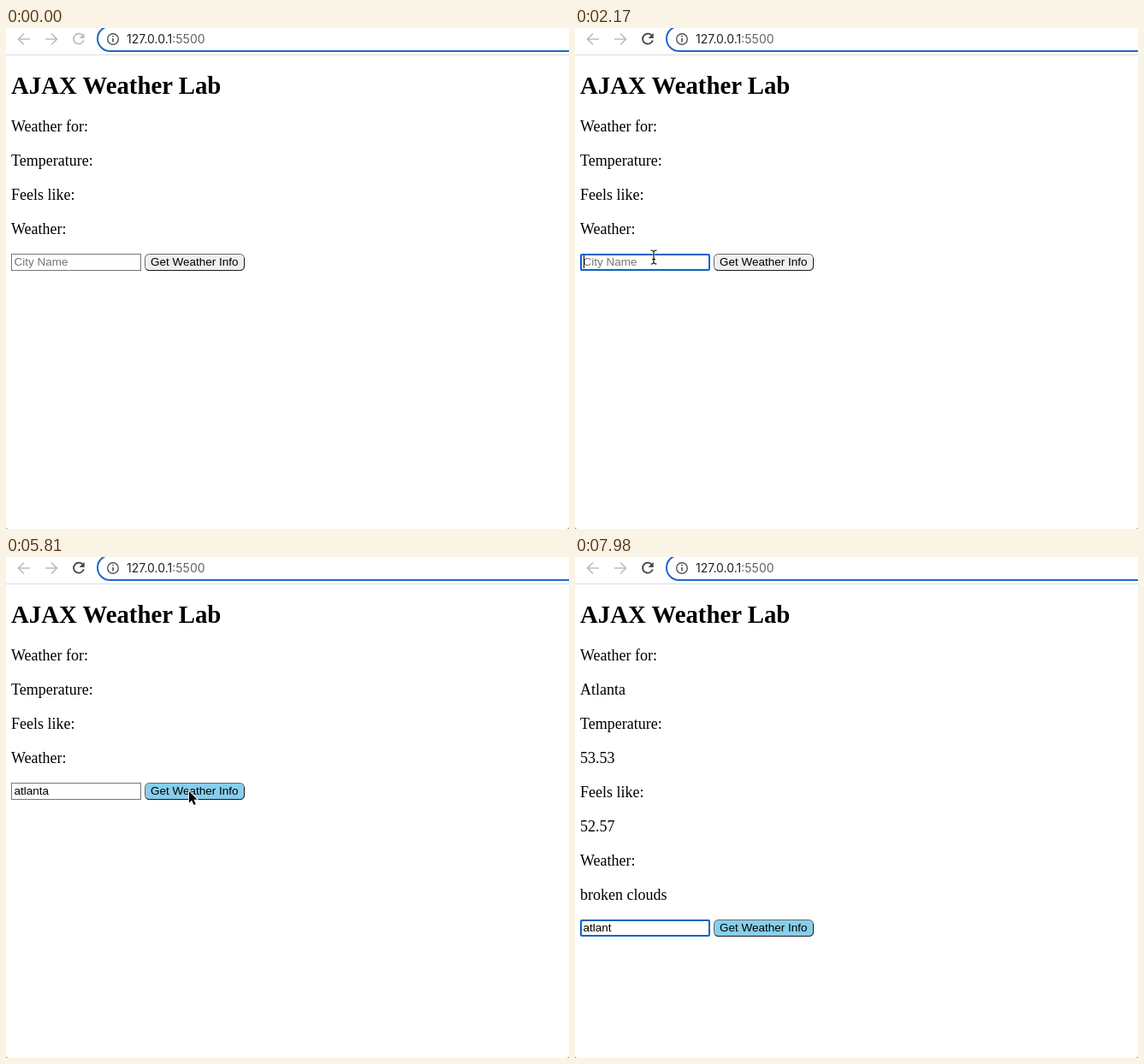
Animation of 658 by 586 pixels, one loop 8 s. Source, as an HTML page:

```html
<!DOCTYPE html>
<html lang="en">
<head>
<meta charset="utf-8">
<title>Weather Lab</title>
<style>
  html, body { margin: 0; width: 100%; height: 100%; overflow: hidden; background: #fff; }
  svg { display: block; }
  .page { font: 18px "Liberation Serif", serif; }
  .form { font: 13.5px "Liberation Sans", sans-serif; }
  .icon { fill: none; stroke: #bbbdc0; stroke-width: 1.7; }
  .url { font: 14px Inter, sans-serif; fill: #202124; }
</style>
</head>
<body>
<svg width="658" height="586" viewBox="0 0 658 586">
  <defs>
    <g id="reloadShape" fill="none" stroke="currentColor" stroke-width="1.8">
      <path d="M90 9.2A6 6 0 1 0 90.8 14.5"/>
      <path d="M91.6 6V12H85.6Z" fill="currentColor" stroke="none"/>
    </g>
  </defs>

  <path d="M0 31.5H658" stroke="#dadce0"/>
  <path class="icon" d="M28 13H15M21 6.5L14.5 13L21 19.5"/>
  <path class="icon" d="M46 13H59M53 6.5L59.5 13L53 19.5"/>
  <use href="#reloadShape" color="#bbbdc0"/>
  <use id="reload" href="#reloadShape" color="#47494d"/>
  <rect x="107" y="-2" width="600" height="29" rx="14.5" fill="#fff" stroke="#2166c2" stroke-width="2"/>
  <circle cx="125" cy="13" r="6.3" fill="none" stroke="#505357" stroke-width="1.4"/>
  <path d="M125 12V16.6M125 9V10.6" stroke="#505357" stroke-width="1.6"/>
  <text class="url" x="141" y="18">127.0.0.1<tspan fill="#5f6368">:5500</tspan></text>

  <g class="page">
    <text x="6" y="77" font-size="28.8" font-weight="bold">AJAX Weather Lab</text>
    <g id="rows"></g>
  </g>

  <g id="form" class="form">
    <rect id="box" fill="#fff"/>
    <text id="field" x="9.5" y="278"></text>
    <path id="caret" stroke="#000"/>
    <rect id="button" x="162.5" y="264.5" width="116" height="19" rx="5" stroke="#666"/>
    <path d="M163.5 282Q165 283.5 167.5 283.5H273.5Q278.5 283.5 278.5 278.5V269" fill="none" stroke="#181818"/>
    <text x="169" y="278">Get Weather Info</text>
  </g>

  <path d="M0 583Q0 586 3 586H0ZM658 583Q658 586 655 586H658Z" fill="#888"/>

  <g id="pointer">
    <path id="arrow" d="M0 0V13.4L3.1 10.6L5.5 16L7.8 15L5.4 9.7H9.5Z" stroke="#fff" stroke-width="1.6" paint-order="stroke"/>
    <g id="beam" fill="none">
      <path d="M-3.5 -8Q0 -8 0 -5.5Q0 -8 3.5 -8M0 -6V6M-3.5 8Q0 8 0 5.5Q0 8 3.5 8M-2 2.5H2" stroke="#fff" stroke-width="2.6" opacity=".8"/>
      <path d="M-3.5 -8Q0 -8 0 -5.5Q0 -8 3.5 -8M0 -6V6M-3.5 8Q0 8 0 5.5Q0 8 3.5 8M-2 2.5H2" stroke="#111" stroke-width="1.2"/>
    </g>
  </g>
</svg>
<script>
const $ = id => document.getElementById(id);
const LOOP = 8000, STEP = 70;
const CITY = 'atlanta';
const LABELS = ['Weather for:', 'Temperature:', 'Feels like:', 'Weather:'];
const RESULTS = ['Atlanta', '53.53', '52.57', 'broken clouds'];

const FOCUS = 1960, CLICK = 5600, LOADED = 5880, REFOCUS = 7070, ERASE = 7840;
const KEYS = [2870, 3010, 3360, 3570, 3710, 3920, 4900];
const CARET_RESETS = [FOCUS, ...KEYS, REFOCUS];
const CARET_ON = 560;

// Pointer stops: time, x, y
const PATH = [
  [70, 207, 537], [210, 180, 460], [420, 120, 350], [560, 96, 308], [700, 90, 295],
  [840, 95, 277], [980, 99, 277], [1820, 99, 277], [1960, 92, 268], [5040, 92, 268],
  [5110, 131, 271], [5250, 158, 275], [5390, 196, 276], [5530, 214, 274],
  [6230, 214, 274], [6370, 227, 292], [6440, 218, 325], [6580, 135, 398],
  [6720, 91, 422], [7000, 92, 434]
];

function set(el, attrs) {
  for (const name in attrs) el.setAttribute(name, attrs[name]);
}

function show(el, on) {
  el.style.display = on ? '' : 'none';
}

function pointerAt(t) {
  const next = PATH.findIndex(stop => stop[0] > t);
  if (next < 0) return PATH[PATH.length - 1].slice(1);
  if (next === 0) return PATH[0].slice(1);
  const [t0, x0, y0] = PATH[next - 1], [t1, x1, y1] = PATH[next];
  const k = (t - t0) / (t1 - t0);
  return [x0 + (x1 - x0) * k, y0 + (y1 - y0) * k];
}

function makeRows(lines) {
  return lines.map((line, i) => `<text x="6" y="${121 + 40 * i}">${line}</text>`).join('');
}

const emptyRows = makeRows(LABELS);
const filledRows = makeRows(LABELS.flatMap((label, i) => [label, RESULTS[i]]));
let shownRows;

function drawForm(t) {
  const loaded = t >= LOADED;
  const rows = loaded ? filledRows : emptyRows;
  if (rows !== shownRows) $('rows').innerHTML = shownRows = rows;
  const shift = loaded ? 160 : 0;
  set($('form'), { transform: `translate(0 ${shift})` });

  const focused = (t >= FOCUS && t < CLICK) || t >= REFOCUS;
  set($('box'), focused
    ? { x: 7, y: 265, width: 150, height: 18, rx: 1, stroke: '#0b62c6', 'stroke-width': 2 }
    : { x: 6.5, y: 264.5, width: 151, height: 19, rx: 0, stroke: '#767676', 'stroke-width': 1 });

  const typed = KEYS.filter(key => key <= t).length - (t >= ERASE ? 1 : 0);
  const field = $('field');
  field.textContent = typed ? CITY.slice(0, typed) : 'City Name';
  set(field, { fill: typed ? '#000' : '#757575' });

  const lastReset = CARET_RESETS.filter(reset => reset <= t).pop();
  show($('caret'), focused && t - lastReset < CARET_ON);
  const caretX = Math.floor(9.6 + (typed ? field.getComputedTextLength() : 0.5)) + 0.5;
  set($('caret'), { d: `M${caretX} 266V281` });

  set($('button'), { fill: t >= CLICK ? '#87ceeb' : '#efefef' });
  return shift;
}

function drawPointer(t, shift) {
  const [x, y] = pointerAt(t);
  const overInput = x >= 6 && x < 158 && y >= 264 + shift && y < 284 + shift;
  show($('pointer'), (t >= 70 && t < KEYS[0]) || (t >= 5110 && t < ERASE));
  show($('arrow'), !overInput);
  show($('beam'), overInput);
  set($('pointer'), { transform: `translate(${x} ${y})` });
}

function draw(now) {
  const t = Math.floor(now % LOOP / STEP) * STEP;
  set($('reload'), { opacity: Math.min(1, Math.max(0, (t - 1120) / 350)) });
  drawPointer(t, drawForm(t));
  requestAnimationFrame(draw);
}

draw(0);
</script>
</body>
</html>
```
